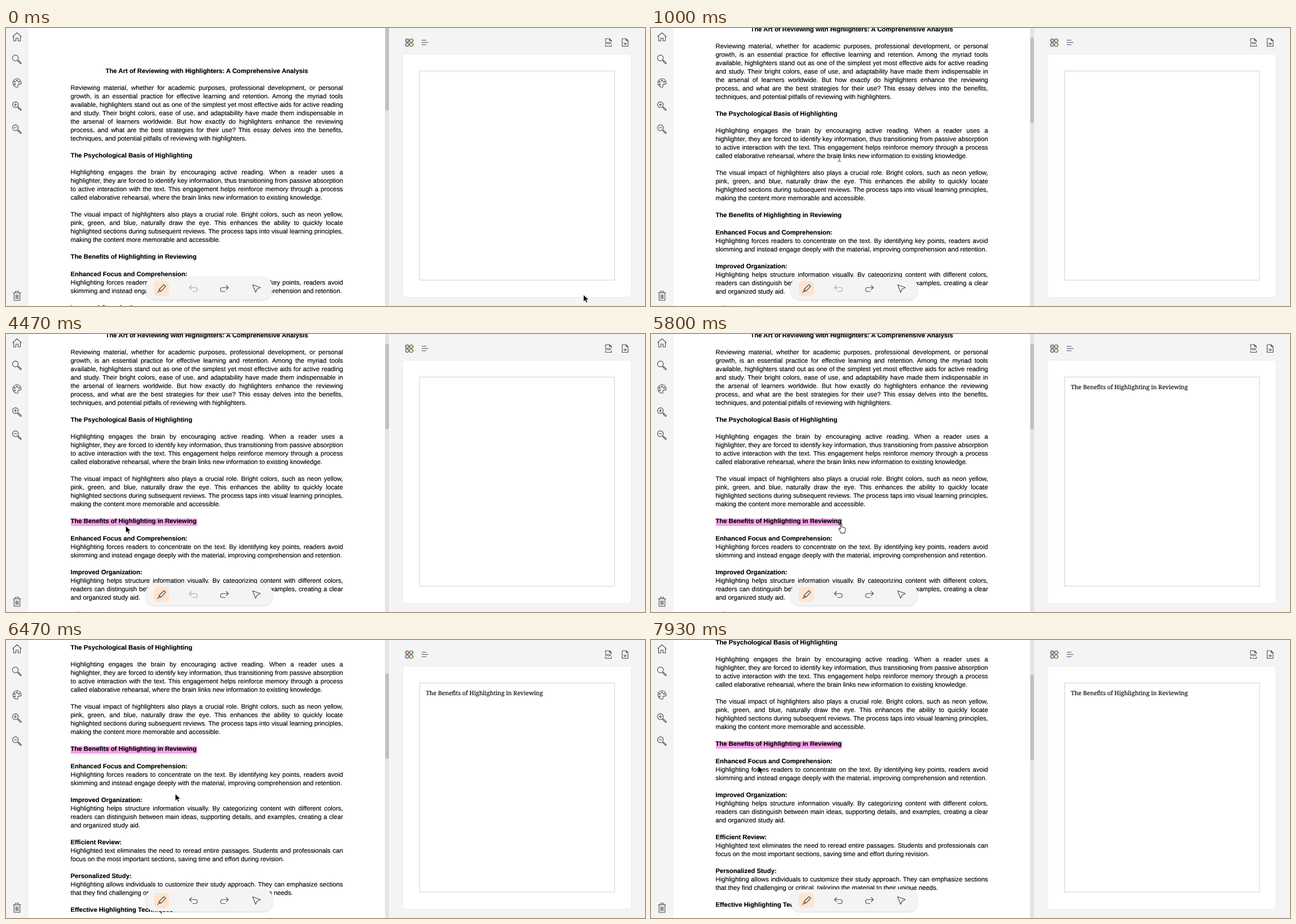
An HTML page for the animation above (8000 ms loop, 1133x494 px).

```html
<!DOCTYPE html>
<html lang="en">
<head>
<meta charset="utf-8">
<title>Highlighter</title>
<style>
  html, body { margin: 0; width: 100%; height: 100%; overflow: hidden; background: #fff; }
  #stage { position: relative; width: 100%; height: 100%; overflow: hidden; contain: strict; }
  #doc {
    position: absolute; left: 114.5px; top: 69.8px; width: 483px;
    font: 11.33px/15.04px "Liberation Sans", Arial, sans-serif; color: #000;
    text-rendering: geometricPrecision; -webkit-text-stroke: .15px #000;
  }
  #doc p { margin: 0; height: 15.04px; white-space: nowrap; }
  #doc .fill { white-space: normal; text-align: justify; text-align-last: justify; }
  #doc .bold { font-weight: bold; }
  #doc .title { font-weight: bold; text-align: center; }
  #mark { position: absolute; z-index: -1; left: 0; top: 332px; height: 13px; background: #f8a2e7; }
  svg { position: absolute; left: 0; top: 0; display: block; }
  #note { text-rendering: geometricPrecision; stroke: #000; stroke-width: .15; }
  .icon { fill: none; stroke: #484848; stroke-width: 1.1; stroke-linecap: round; stroke-linejoin: round; }
  #bar { filter: drop-shadow(0 1px 2px rgba(0, 0, 0, .16)); }
</style>
</head>
<body>
<div id="stage">
<div id="doc"><div id="mark"></div></div>
<svg width="1133" height="494" viewBox="0 0 1133 494">
  <rect width="40" height="494" fill="#f4f4f4"/>
  <rect x="672" width="7" height="494" fill="#e4e4e4"/>
  <rect id="thumb" x="672.5" width="6.5" height="152" rx="3" fill="#c1c1c1"/>
  <rect x="679" width="454" height="494" fill="#f4f4f4"/>
  <rect x="703.5" y="46.5" width="405" height="432" rx="4" fill="#fff" stroke="#ececec"/>
  <rect x="733.5" y="76.5" width="345.5" height="371.5" fill="#fff" stroke="#d0d0d0"/>
  <text id="note" x="744.5" y="98" font-family="'Noto Serif', serif" font-size="10.5">The Benefits of Highlighting in Reviewing</text>

  <g class="icon">
    <path d="M11.8 15.3 19.5 8.5 27.2 15.3M13.5 14V23H17.5V18H21.5V23H25.5V14"/>
    <g id="lens"><circle cx="16.7" cy="53.3" r="5.2"/><path d="M20.5 57 21.8 58.3M21.4 59.4 25.9 63.7 27.4 62.3 22.8 58Z"/></g>
    <use href="#lens" y="83"/><path d="M14.2 136.3H19.2M16.7 133.8V138.8"/>
    <use href="#lens" y="124"/><path d="M14.2 177.3H19.2"/>
    <path d="M19.5 90A7.5 7.5 0 1 0 20 105.2C22 105 20.8 102.5 21 101.3 21.5 99.3 24 99.8 25.5 99.6 27 99.3 27 97.5 26.8 96A7.5 7.5 0 0 0 19.5 90Z"/>
    <circle cx="15.5" cy="95.5" r="1"/><circle cx="19.5" cy="93.5" r="1"/>
    <circle cx="23.3" cy="95.6" r="1"/><circle cx="15.7" cy="100" r="1"/>
    <path d="M13 470.5H26M16.7 470.5V467.7H22.3V470.5M14.3 470.5V484H24.7V470.5M17.5 474V481M19.5 474V481M21.5 474V481"/>
    <g stroke-width="1">
      <circle cx="711.4" cy="22.4" r="3.3" fill="#f7a9a9"/><circle cx="718.6" cy="22.4" r="3.3" fill="#b5f2b5"/>
      <circle cx="711.4" cy="29.6" r="3.3" fill="#a9dcf8"/><circle cx="718.6" cy="29.6" r="3.3" fill="#f9f0a0"/>
    </g>
    <path d="M737.5 21.7H745M737.5 25.7H748.5M737.5 29.7H745"/>
    <path d="M1063 24V19H1070L1073.5 22.5V24M1070 19V22.5H1073.5M1063 30V32.5H1073.5V30"/>
    <path d="M1092.5 19H1099.5L1103 22.5V32.5H1092.5ZM1099.5 19V22.5H1103"/>
  </g>
  <g font-family="'Liberation Sans', sans-serif" font-weight="bold" text-anchor="middle" fill="#484848">
    <text x="1068.2" y="29.3" font-size="5.6">PDF</text>
    <text x="1097.8" y="30" font-size="6">W</text>
  </g>

  <rect id="bar" x="248" y="443" width="224" height="39" rx="16" fill="#f5f4f4"/>
  <rect x="262" y="449.5" width="27" height="26.5" rx="6" fill="#ffe4cf"/>
  <g class="icon">
    <path d="M271.5 464.5 280 456 283 459 274.8 467.6 271 468.3ZM271.5 464.5 274.8 467.6M271 468.3 268.5 470"/>
    <path id="undo" d="M329 457.5 325.2 461.3 329 465M325.2 461.3H335.7A3.4 3.4 0 0 1 335.7 468.2H331"/>
    <path d="M329 457.5 325.2 461.3 329 465M325.2 461.3H335.7A3.4 3.4 0 0 1 335.7 468.2H331" transform="translate(719.5) scale(-1 1)"/>
    <path d="M437.3 456.3 451 461.3 445.2 464 442.6 469.8Z"/>
  </g>

  <g id="cursor" stroke-linejoin="round">
    <path id="arrow" d="M0 0V12.3L2.9 9.7 5 14.2 7 13.3 5 8.9H9Z" fill="#000" stroke="#fff" stroke-width=".7"/>
    <path id="beam" d="M-3-6H-1L0-5.2 1-6H3M0-5.2V5.2M-3 6H-1L0 5.2 1 6H3" fill="none" stroke="#4d4d4d"/>
    <path id="hand" d="M-1.2 8V1Q-1.2-.6 0-.6T1.2 1V5.2Q2.4 4.4 3.4 5.6 4.7 4.9 5.7 6.2 7.6 5.9 7.8 7.6V10.5Q7.8 12.4 6.6 13.8V16H-.3V14.2Q-2.4 12-3.9 9.2-4.5 7.6-3.4 7.3-2.4 7-1.2 9Z" fill="#fff" stroke="#111"/>
  </g>
</svg>
</div>
<script>
const LOOP = 8000, FPS = 15;
const $ = id => document.getElementById(id);

// "^" centred title, "*" bold heading; lines followed by more of their paragraph are justified
const lines = `^The Art of Reviewing with Highlighters: A Comprehensive Analysis

Reviewing material, whether for academic purposes, professional development, or personal
growth, is an essential practice for effective learning and retention. Among the myriad tools
available, highlighters stand out as one of the simplest yet most effective aids for active reading
and study. Their bright colors, ease of use, and adaptability have made them indispensable in
the arsenal of learners worldwide. But how exactly do highlighters enhance the reviewing
process, and what are the best strategies for their use? This essay delves into the benefits,
techniques, and potential pitfalls of reviewing with highlighters.

*The Psychological Basis of Highlighting

Highlighting engages the brain by encouraging active reading. When a reader uses a
highlighter, they are forced to identify key information, thus transitioning from passive absorption
to active interaction with the text. This engagement helps reinforce memory through a process
called elaborative rehearsal, where the brain links new information to existing knowledge.

The visual impact of highlighters also plays a crucial role. Bright colors, such as neon yellow,
pink, green, and blue, naturally draw the eye. This enhances the ability to quickly locate
highlighted sections during subsequent reviews. The process taps into visual learning principles,
making the content more memorable and accessible.

*The Benefits of Highlighting in Reviewing

*Enhanced Focus and Comprehension:
Highlighting forces readers to concentrate on the text. By identifying key points, readers avoid
skimming and instead engage deeply with the material, improving comprehension and retention.

*Improved Organization:
Highlighting helps structure information visually. By categorizing content with different colors,
readers can distinguish between main ideas, supporting details, and examples, creating a clear
and organized study aid.

*Efficient Review:
Highlighted text eliminates the need to reread entire passages. Students and professionals can
focus on the most important sections, saving time and effort during revision.

*Personalized Study:
Highlighting allows individuals to customize their study approach. They can emphasize sections
that they find challenging or critical, tailoring the material to their unique needs.

*Effective Highlighting Techniques`.split("\n");

lines.forEach((line, i) => {
  const p = document.createElement("p");
  p.className = { "^": "title", "*": "bold" }[line[0]] || (lines[i + 1] ? "fill" : "");
  p.textContent = line.replace(/^[\^*]/, "");
  $("doc").append(p);
});

// Keys are [time, value, ...]
const scrollKeys = [[0, 0], [700, 0], [870, 74], [5930, 74], [6200, 140], [6470, 213.5], [6600, 222]];
const cursorKeys = [
  [0, 1024, 474], [760, 334, 231], [1330, 334, 231], [1600, 398, 265], [1730, 399, 258],
  [1800, 399, 258], [1930, 394, 256], [2070, 394, 256], [2870, 145, 293], [2930, 145, 293],
  [3530, 121, 333], [3800, 120, 333], [4070, 120, 333], [4470, 213, 341], [4930, 303, 334],
  [5530, 336, 337], [5800, 337, 338], [6470, 300, 273], [6600, 296, 252], [6900, 311, 236],
  [7400, 330, 246], [7460, 330, 246], [7530, 327, 244], [7670, 327, 244], [7930, 190, 224]
];
const shapeKeys = [
  [0, "arrow"], [720, "beam"], [4270, "arrow"], [5000, "beam"], [5800, "hand"], [5930, "arrow"]
];

// Monotone cubic through the keys, one result per value column
function track(keys, t) {
  const last = keys.length - 1;
  if (t >= keys[last][0]) return keys[last].slice(1);
  const i = keys.findIndex(k => k[0] > t) - 1;
  const [a, b] = [keys[i], keys[i + 1]];
  const h = b[0] - a[0], u = (t - a[0]) / h;
  return a.slice(1).map((v, n) => {
    const c = n + 1;
    const slope = j => j < 0 || j >= last ? 0 : (keys[j + 1][c] - keys[j][c]) / (keys[j + 1][0] - keys[j][0]);
    const tangent = j => {
      const p = slope(j - 1), q = slope(j);
      return p * q > 0 ? 2 * p * q / (p + q) : 0;
    };
    const d = b[c] - v, m0 = tangent(i) * h, m1 = tangent(i + 1) * h;
    return v + u * m0 + u * u * (3 * d - 2 * m0 - m1) + u * u * u * (m0 + m1 - 2 * d);
  });
}

function draw(t) {
  const [scroll] = track(scrollKeys, t);
  const [x, y] = track(cursorKeys, t);
  const shape = shapeKeys.filter(k => k[0] <= t).pop()[1];
  const saved = t >= 5795;

  $("doc").style.transform = `translateY(${-scroll}px)`;
  $("thumb").setAttribute("y", -5 + scroll * 0.302);
  $("mark").style.width = (t < 4125 ? 0 : t < 4270 ? x - 114.5 : 224) + "px";
  $("note").style.display = saved ? "" : "none";
  $("undo").style.stroke = saved ? "" : "#a6a6a6";
  $("cursor").setAttribute("transform", `translate(${x} ${y})`);
  for (const id of ["arrow", "beam", "hand"]) $(id).style.display = id === shape ? "" : "none";
}

// Like a screen recording, time advances in 15 steps a second
const start = performance.now();
function tick() {
  const t = (performance.now() - start) % LOOP;
  draw(Math.floor((t + 4) * FPS / 1000) * 1000 / FPS);
  requestAnimationFrame(tick);
}
tick();
</script>
</body>
</html>
```
